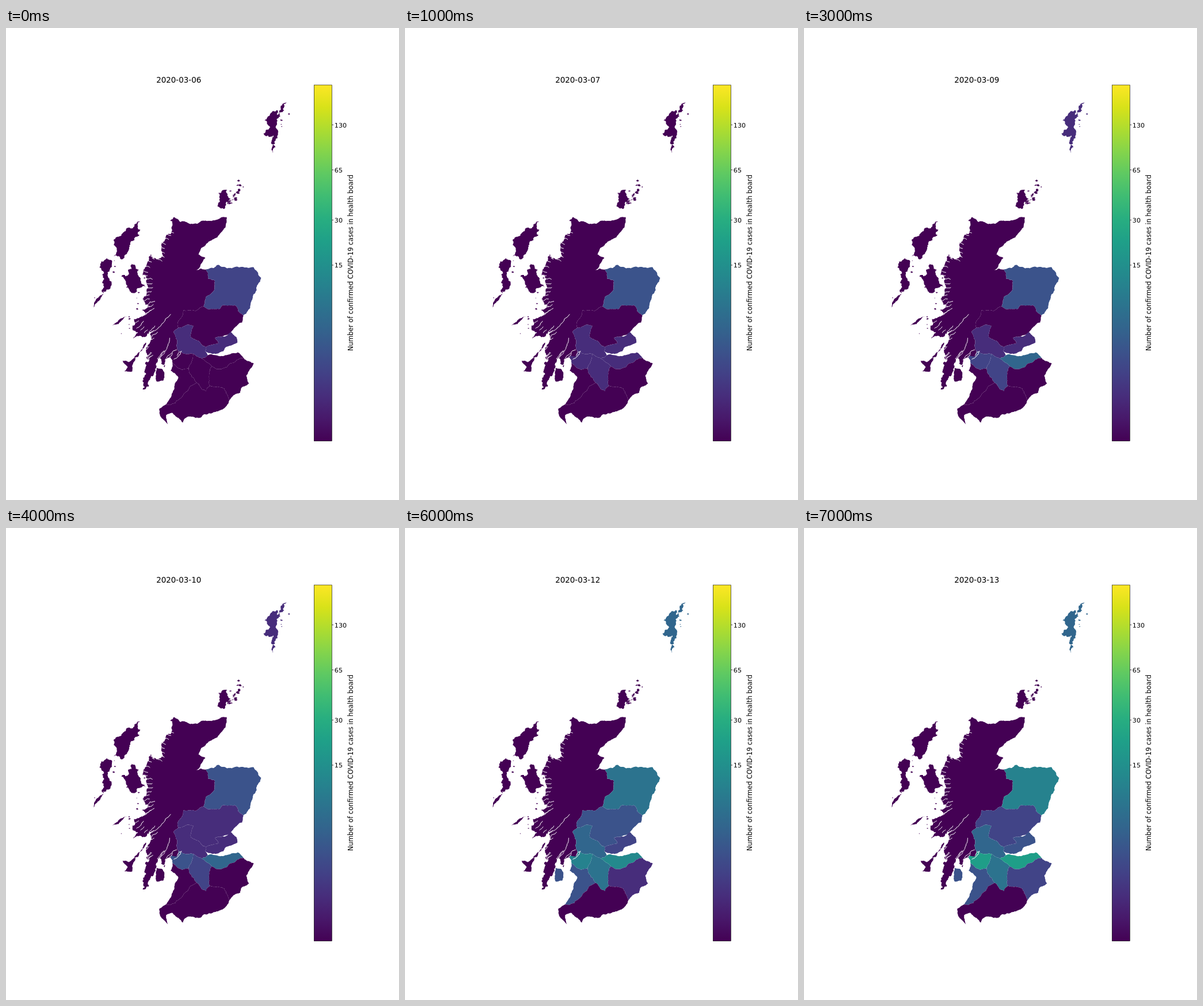
These frames come from a looping animation (683 px wide and 820 px high, 8 s). An HTML page:

```html
<!DOCTYPE html>
<html lang="en">
<head>
<meta charset="utf-8">
<title>Cases by health board</title>
<style>
  html, body { margin: 0; width: 100%; height: 100%; overflow: hidden; background: #fff; }
  svg { display: block; font: 11.2px "DejaVu Sans", sans-serif; }
</style>
</head>
<body>
<svg id="stage" width="683" height="820" viewBox="0 0 683 820">
  <defs><linearGradient id="scale" x1="0" y1="1" x2="0" y2="0"></linearGradient></defs>
  <g id="map" transform="translate(.4 .4)"></g>
  <text id="date" x="300.2" y="95" font-size="13.44" text-anchor="middle"></text>
  <rect x="535.3" y="99" width="31" height="618.6" fill="url(#scale)" stroke="#000" stroke-width=".6"/>
  <g id="ticks"></g>
  <text transform="translate(603 408) rotate(-90)" font-size="11.4" text-anchor="middle">Number of confirmed COVID-19 cases in health board</text>
</svg>
<script>
const viridis = ('440154 48186a 472d7b 424086 3b528b 33638d 2c728e 26828e 21918c ' +
  '1fa088 28ae80 3fbc73 5ec962 84d44b addc30 d8e219 fde725').split(' ').map(c => '#' + c);
const maxCases = 240;

// Key points of coasts and borders; neighbouring boards share them, fractal detail is added below.
const lines = {
  north: '291,328 320,340 342,334 383,328 381,346 334,393 346,399 330,420 347,419',
  west: '298,569 275,590 268,570 252,604 248,622 237,627 243,600 250,576 241,577 250,545 252,527 222,505 244,496 236,488 250,484 239,467 246,447 248,404 252,392 274,397 270,378 289,342 285,334 291,328',
  highGramp: '347,419 351,435 362,438 361,456 347,467 343,483',
  highTay: '343,483 308,490 298,511 299,520',
  highForth: '299,520 291,527 299,561',
  highGlas: '299,561 298,569',
  grampCoast: '347,419 369,411 392,417 430,415 443,434 424,485 412,499',
  grampTay: '412,499 397,481 378,481 370,488 343,483',
  tayCoast: '412,499 410,511 393,525 372,536',
  tayFife: '372,536 363,538 369,547 347,554',
  forthTay: '299,520 325,517 321,537 338,548 347,554',
  fifeCoast: '372,536 391,528 402,545 384,553 368,565 346,561',
  fifeForth: '346,561 347,554',
  forthCoast: '346,561 350,568',
  forthLoth: '350,568 340,574',
  forthGlas: '299,561 326,566',
  forthLan: '326,566 340,574',
  glasCoast: '298,569 285,569 289,582',
  glasAyr: '289,582 305,593 317,591',
  glasLan: '326,566 322,580 317,591',
  lanAyr: '317,591 319,600 331,616',
  lanDum: '331,616 347,630 354,621',
  lanBord: '357,587 354,621',
  lothLan: '340,574 357,587',
  lothCoast: '350,568 386,567 402,563 413,573',
  lothBord: '357,587 374,592 390,582 413,573',
  bordCoast: '413,573 430,582 417,604 422,617 388,646',
  bordDum: '354,621 379,626 388,646',
  ayrCoast: '289,582 286,595 299,606 292,627 275,655',
  ayrDum: '275,655 294,651 311,633 331,616',
  dumCoast: '388,646 381,658 354,669 312,677 307,685 288,668 278,672 281,688 266,661 275,655',
  arran: '262,590 272,593 273,612 262,614',
  skye: '200,431 211,430 218,408 230,430 244,450 222,460 208,442',
  mull: '219,517 236,513 248,527 221,541 229,529',
  jura: '243,546 229,571 222,572',
  islay: '225,570 219,596 205,596 211,588 202,578 213,580',
  tiree: '183,516 210,500 195,514',
  lewis: '232,335 233,350 214,383 199,401 187,396 192,385 187,367 208,351',
  uist: '165,405 183,403 176,424 174,457 166,458 170,425',
  barra: '169,461 152,485 160,468',
  orkney: '369,286 384,281 386,294 395,299 378,314 367,309 370,298',
  shetland: '455,153 470,142 476,152 470,168 473,180 467,200 464,216 461,196 464,186 447,183 459,172 449,160',
  yell: '470,151 477,139 487,128 483,143'
};
const rugged = ['west', 'skye', 'mull', 'lewis', 'uist', 'orkney', 'shetland', 'yell'];

// rings: outlines built from lines (a minus reverses one); cases: one base-36 digit per day;
// islets: how many lie scattered between two places, and their size.
const boards = [
  { rings: ['north highGramp highTay highForth highGlas west', 'skye', 'mull', 'jura', 'islay', 'tiree'],
    cases: '00000000', islets: [12, '205,540 240,425', 1.6] },
  { rings: ['lewis', 'uist', 'barra'], cases: '00000000', islets: [8, '158,478 190,398', 1.8] },
  { rings: ['orkney'], cases: '00000000', islets: [18, '384,312 410,264', 3.2] },
  { rings: ['shetland', 'yell'], cases: '00011155', islets: [6, '470,185 486,145', 1.6] },
  { rings: ['grampCoast grampTay -highGramp'], cases: '2333357a' },
  { rings: ['-grampTay tayCoast tayFife -forthTay -highTay'], cases: '00001132' },
  { rings: ['fifeCoast fifeForth -tayFife'], cases: '11111123' },
  { rings: ['forthTay -fifeForth forthCoast forthLoth -forthLan -forthGlas -highForth'], cases: '11111155' },
  { rings: ['forthGlas glasLan -glasAyr -glasCoast -highGlas'], cases: '011234ak' },
  { rings: ['forthLan lothLan lanBord -lanDum -lanAyr -glasLan'], cases: '01122377' },
  { rings: ['lothCoast -lothBord -lothLan -forthLoth'], cases: '012558ck' },
  { rings: ['lothBord bordCoast -bordDum -lanBord'], cases: '00000112' },
  { rings: ['glasAyr lanAyr -ayrDum -ayrCoast', 'arran'], cases: '00000233' },
  { rings: ['ayrDum lanDum bordDum dumCoast'], cases: '00000000' }
];

const $ = id => document.getElementById(id);
function add(parent, tag, attrs, text = '') {
  const node = document.createElementNS('http://www.w3.org/2000/svg', tag);
  for (const key in attrs) node.setAttribute(key, attrs[key]);
  node.textContent = text;
  return parent.appendChild(node);
}

const parse = text => text.split(' ').map(pair => pair.split(',').map(Number));
const mix = (a, b, t) => a + (b - a) * t;
// Repeatable random number from 0 to 1 for a place.
const hash = (x, y) => {
  const n = Math.sin(x * 12.9898 + y * 78.233) * 43758.5453;
  return n - Math.floor(n);
};
// Midpoint displacement that depends on place only, so shared lines stay equal in both directions.
function fractal(p, q, amount) {
  const length = Math.hypot(q[0] - p[0], q[1] - p[1]);
  if (length < 2.5) return [p];
  const x = (p[0] + q[0]) / 2, y = (p[1] + q[1]) / 2, size = length * amount;
  const middle = [x + (hash(x, y) - 0.5) * size, y + (hash(y, x) - 0.5) * size];
  return [...fractal(p, middle, amount), ...fractal(middle, q, amount)];
}
const roughen = (points, amount) =>
  [...points.slice(1).flatMap((q, i) => fractal(points[i], q, amount)), points.at(-1)];
function line(name) {
  const key = name.replace('-', ''), points = parse(lines[key]);
  if (points.length > 2 && !key.match(/[A-Z]/) && key !== 'west' && key !== 'north') points.push(points[0]);
  const rough = roughen(points, rugged.includes(key) ? 0.55 : 0.26);
  return key === name ? rough : rough.reverse();
}
const trace = points => 'M' + points.map(p => p.map(v => v.toFixed(2))).join('L');
const ring = names => trace(names.split(' ').flatMap(line)) + 'Z';

function scatter(count, ends, size) {
  const [a, b] = parse(ends);
  return Array.from({ length: count }, (_, i) => {
    const t = (i + 0.5) / count, r = size * (0.4 + hash(i, 3));
    const x = mix(a[0], b[0], t) + (hash(i, 1) - 0.5) * 20;
    const y = mix(a[1], b[1], t) + (hash(i, 2) - 0.5) * 10;
    const corners = [0, 1, 2, 3, 0].map(k => [x + r * Math.cos(k * 1.57 + i), y + r * 0.6 * Math.sin(k * 1.57 + i)]);
    return trace(roughen(corners, 0.6)) + 'Z';
  }).join('');
}

for (const { rings, islets, ...board } of boards) {
  const d = rings.map(ring).join('') + (islets ? scatter(...islets) : '');
  boards[boards.findIndex(b => b.rings === rings)].node = add($('map'), 'path', { d });
}

// Sea lochs run inland from the west coast, north-east in the south and eastwards further north.
const lochs = line('west').filter(([x, y], i) => i % 6 === 0 && y < 580 && y > 350).map(([x, y], i) => {
  const south = Math.min(1, Math.max(0, (y - 400) / 120));
  const angle = mix(0.5, -0.85, south), length = mix(5, 12, south) * (0.6 + hash(x, i));
  const end = [x + length * Math.cos(angle), y + length * Math.sin(angle)];
  return trace(roughen([[x - 1, y], end], 0.3));
});
const greatLochs = ['250,529 286,497', '267,573 284,538'].map(ends => trace(roughen(parse(ends), 0.2)));
add($('map'), 'path', { d: [...lochs, ...greatLochs].join(''), fill: 'none', stroke: '#fff', 'stroke-width': 1 });

viridis.forEach((color, i) => add($('scale'), 'stop', { offset: i / 16, 'stop-color': color }));
for (const value of [15, 30, 65, 130]) {
  const y = 717.6 - 618.6 * Math.log(value) / Math.log(maxCases);
  add($('ticks'), 'path', { d: `M566.3 ${y}h3`, stroke: '#000', 'stroke-width': 0.7 });
  add($('ticks'), 'text', { x: 570.8, y: y + 4.3 }, value);
}

function colorOf(cases) {
  const step = 16 * Math.log(cases + 1) / Math.log(maxCases), i = Math.floor(step);
  return `color-mix(in srgb, ${viridis[i + 1]} ${(step - i) * 100}%, ${viridis[i]})`;
}

let shown = -1;
function draw() {
  const day = Math.floor(performance.now() / 1000) % 8;
  if (day !== shown) {
    shown = day;
    $('date').textContent = '2020-03-' + String(day + 6).padStart(2, '0');
    for (const { node, cases } of boards) node.style.fill = colorOf(parseInt(cases[day], 36));
  }
  requestAnimationFrame(draw);
}
draw();
</script>
</body>
</html>
```
